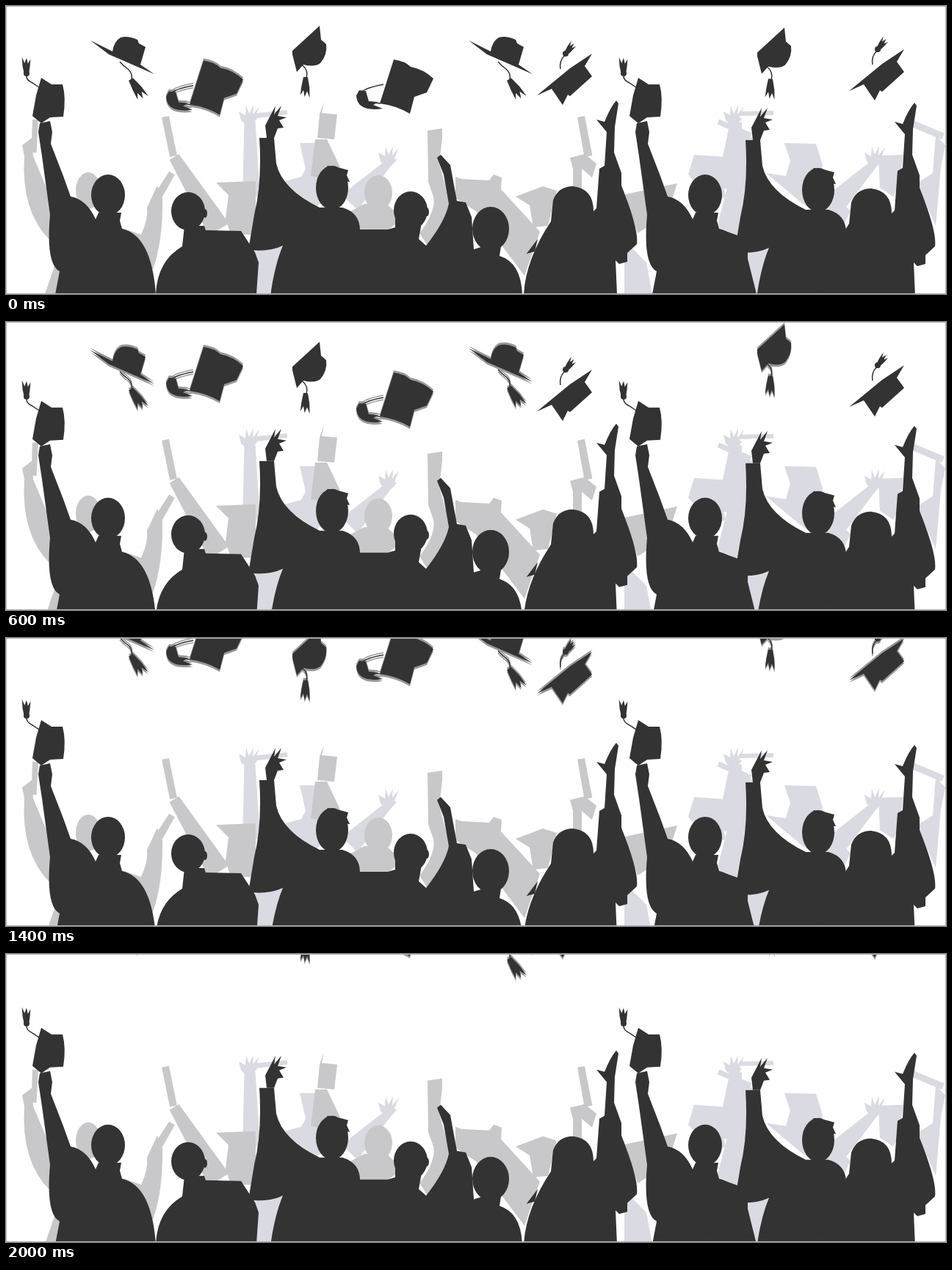
Write an HTML page with a canvas that moves like this. It is 1280x393 px and loops after 2100 ms.

```html
<!DOCTYPE html>
<html lang="en">
<head>
<meta charset="utf-8">
<title>Graduation</title>
<style>
html, body { margin: 0; width: 100%; height: 100%; overflow: hidden; background: #fff; }
canvas { display: block; }
</style>
</head>
<body>
<canvas id="stage" width="1280" height="393"></canvas>
<script>
const ctx = document.getElementById('stage').getContext('2d');
const DARK = '#333', GREY = '#c8c8cb', PALE = '#dadae2', GHOST = '#999';

const outline = d => new Path2D(d);
const place = (path, x, y = 0, turn = 0, size = 1) => {
  const out = new Path2D();
  out.addPath(path, new DOMMatrix().translate(x, y).rotate(turn).scale(size));
  return out;
};
const shift = (paths, x, y) => paths.map(path => place(path, x, y));
const head = (x, y, rx, ry) => {
  const out = new Path2D();
  out.ellipse(x, y, rx, ry, 0, 0, 2 * Math.PI);
  return out;
};
// Tapered bar for arms and diplomas
const limb = (x1, y1, w1, x2, y2, w2) => {
  const length = 2 * Math.hypot(x2 - x1, y2 - y1);
  const nx = (y1 - y2) / length, ny = (x2 - x1) / length;
  const out = new Path2D();
  out.moveTo(x1 + nx * w1, y1 + ny * w1);
  out.lineTo(x2 + nx * w2, y2 + ny * w2);
  out.lineTo(x2 - nx * w2, y2 - ny * w2);
  out.lineTo(x1 - nx * w1, y1 - ny * w1);
  out.closePath();
  return out;
};
const openHand = outline('M-11 4L-14-8-5-3-4-16 0-5 6-17 5-4 14-15 8 0 11 2 0 14Z');
const fringe = outline('M-3 0H3L6 14 7 28 3 19 0 27-2 18-6 25-5 13Z');

// Front row
const capHolder = [
  head(139, 258, 23, 28),
  outline('M46 160L60 157 63 172 61 188 78 232 88 260Q110 264 122 291L126 282H157L155 293 158 304Q198 313 204 393V420H62L73 362Q54 352 60 285L49 205 44 172Z')
];
const shortHair = [
  head(248, 280, 23, 26), head(271, 283, 3, 6),
  outline('M204 420V393Q206 348 240 328L243 300H270L272 306 320 307 339 336 344 350 341 393V420Z')
];
const waver = [
  head(444, 248, 22, 30),
  outline('M424 235L438 218 455 221 466 224 464 231 468 240Z'),
  outline('M355 180L353 163 367 136 365 148 375 136 370 150 382 152 372 156 378 166 370 167 365 180Z'),
  outline('M345 180H365L368 215Q376 250 427 275H458Q482 282 482 306L505 330V420H357Q363 360 377 327 358 336 330 333L338 285Q349 240 345 180Z')
];
const pointer = [
  head(551, 279, 23, 26), head(573, 281, 3, 6), head(660, 304, 25, 30),
  outline('M478 305H520L530 302V290H567L562 318 572 327Q598 294 603 270L596 230 587 207 592 203 605 217 614 266 626 268 634 288 637 332 650 328H674L672 341Q701 350 703 393V420H478Z')
];
const longHair = [
  outline('M705 420V393Q708 345 742 294L745 265Q752 246 772 246 800 249 800 280L804 276 808 222 815 218 818 172 804 155 815 158Q823 138 831 129L834 133 829 165 828 200 838 228V245Q862 305 859 325L846 337V349L835 352 830 347 832 393V420Z'),
  outline('M708 339L724 318 720 335 709 338Z')
];
const frontRow = [
  ...capHolder, ...shift(capHolder, 813), ...shortHair,
  ...waver, ...shift(waver, 662, 3), ...pointer,
  ...longHair, ...shift(longHair, 406, 3),
  outline('M966 302L1010 318V345L1022 393V420H950Z')
];

// Back rows, darker grey
const farLeft = [
  limb(40, 155, 8, 38, 200, 7), head(112, 252, 17, 25),
  outline('M22 190L35 180 37 205 60 260V320Q20 280 25 205Z'),
  outline('M66 355L53 393V420H80V360Z')
];
const scrollPair = [
  outline('M158 303L184 312Q194 290 192 275L206 245 213 262Q214 320 200 360Z'),
  limb(226, 228, 9, 208, 258, 11),
  limb(217, 151, 10, 228, 205, 10), limb(229, 206, 15, 290, 305, 32),
  outline('M286 241L340 239V312H306L299 290 303 258Z')
];
const capAndFist = [
  outline('M433 131L427 148 424 180 447 182 451 148 430 146Z'),
  outline('M421 182H437L455 220 430 235 415 232Z'),
  head(507, 255, 19, 24), outline('M460 285L488 270H518L540 290 520 306H460Z'),
  outline('M574 170L594 167V180L590 215 605 270Q598 300 574 327L563 310Q586 280 582 260L575 240Z')
];
const centre = [
  outline('M612 233L620 236 658 238 664 230 675 234 674 250 727 308 706 368 640 280 612 262Z'),
  outline('M694 260L731 246 750 252 738 300 718 302 713 272Z'),
  limb(783, 151, 10, 793, 205, 11),
  outline('M768 207L788 202 804 215 798 234 784 222V250H772V222Z'),
  outline('M843 257L914 242 900 285 860 310Z')
];
const greyRow = [...farLeft, ...scrollPair, ...capAndFist, ...centre];

// Back rows, paler grey
const wave = [place(openHand, 521, 208), limb(519, 216, 11, 468, 268, 30)];
const paleLeft = [
  place(openHand, 331, 152), limb(332, 158, 15, 334, 260, 24), limb(338, 150, 7, 383, 145, 6),
  outline('M400 187H421L445 225 460 238 422 275 376 240 402 233 408 222Z'),
  outline('M339 335L380 327 359 393V420H340Z'),
  outline('M842 320L872 350 880 393V420H842Z')
];
const paleRight = [
  outline('M937 203L980 206 974 232 980 260 962 270 929 230Z'),
  place(openHand, 991, 152), limb(994, 158, 16, 985, 250, 36),
  limb(1000, 147, 6, 1045, 146, 6), limb(970, 158, 7, 1014, 177, 8),
  outline('M1000 174L1022 182 1010 318 968 302 988 225Z'),
  outline('M1004 337L1040 328 1022 393V420H1000Z')
];
const paleEnd = [
  outline('M1060 187L1103 188 1112 217 1108 235 1150 280 1140 300 1085 270 1035 228 1062 232 1068 211Z'),
  outline('M1188 204L1222 203 1216 245 1208 260 1190 248Z'),
  limb(1233, 160, 9, 1276, 178, 9),
  outline('M1266 176L1279 190 1273 220 1266 300 1240 242 1262 228Z')
];
const paleRow = [...paleLeft, ...wave, ...shift(wave, 662), ...paleRight, ...paleEnd];

// Caps: filled parts and thin cords
const cap = (cord, ...fills) => ({ cord: outline(cord), fills });
const brim = cap('M155 76Q160 82 166 86 173 92 171 102',
  outline('M115 47L145 62Q147 48 156 43 166 40 179 46L181 51 190 56 183 80 202 93 140 66Z'),
  place(fringe, 170, 100, -32, 1.15));
const broad = cap('M514 107Q492 111 484 117M510 133L494 131',
  outline('M528 73Q543 75 551 83 568 86 582 99L573 118 556 124 550 147Q532 136 509 133Z'),
  outline('M481 115L490 116 494 130 507 131 500 135 513 140Q478 145 477 122Z'));
const upright = cap('M404 81Q412 88 409 98',
  outline('M427 27L429 46 436 52Q438 66 428 78 420 84 405 80L396 90 390 66V61Z'),
  place(fringe, 408, 97, 3));
const tilted = cap('M755 86Q753 75 761 67',
  outline('M723 122L768 85 798 65 788 82 798 96 768 123 765 121 758 135 743 113Z'),
  head(762, 65, 4, 4), place(fringe, 761, 67, -142, .75));
const held = cap('M28 94Q27 101 36 105L45 111',
  outline('M48 98L62 107H77Q82 125 78 151L60 152 48 160 36 150 41 122Z'),
  head(28, 92, 4, 4), place(fringe, 28, 95, 180, .9));

// [cap, dx, dy, first step, pixels per step]
const flying = [
  [brim, 0, 0, 4, 8.5], [broad, -259, 1.5, 0, 8.1], [upright, 0, 0, 9.8, 12.3],
  [broad, 0, 0, 4.6, 10], [brim, 515, 0, 3.1, 5.9], [tilted, 0, 0, 9.7, 14],
  [upright, 633, 2.5, 1.4, 7.2], [tilted, 425, -6, 7.7, 11]
];

function paint(color, x, y, fills, cord) {
  ctx.setTransform(1, 0, 0, 1, x, y);
  ctx.fillStyle = ctx.strokeStyle = color;
  for (const path of fills) ctx.fill(path);
  if (cord) ctx.stroke(cord);
}

function render(now) {
  const step = Math.max(0, Math.floor(now % 2100 / 100) - 1);
  const dip = step <= 10 ? 1.95 * step : 19.5 - 1.85 * (step - 10);

  ctx.setTransform(1, 0, 0, 1, 0, 0);
  ctx.fillStyle = '#fff';
  ctx.fillRect(0, 0, 1280, 393);
  ctx.lineWidth = 1.5;

  paint(PALE, 0, dip, paleRow);
  paint(GREY, 0, dip, greyRow);
  paint(DARK, 0, dip, frontRow);
  for (const x of [0, 813]) paint(DARK, x, dip, held.fills, held.cord);

  for (const [{ fills, cord }, x, y, start, speed] of flying) {
    const top = y - Math.max(0, step - start) * speed;
    if (step >= start) for (const blur of [-3, 3]) paint(GHOST, x, top + blur, fills, cord);
    paint(DARK, x, top, fills, cord);
  }

  ctx.setTransform(1, 0, 0, 1, 0, 0);
  ctx.lineWidth = 1;
  ctx.strokeStyle = '#b4b4b4';
  ctx.strokeRect(.5, .5, 1279, 392);
}

const began = performance.now();
function tick() {
  render(performance.now() - began);
  requestAnimationFrame(tick);
}
tick();
</script>
</body>
</html>
```
